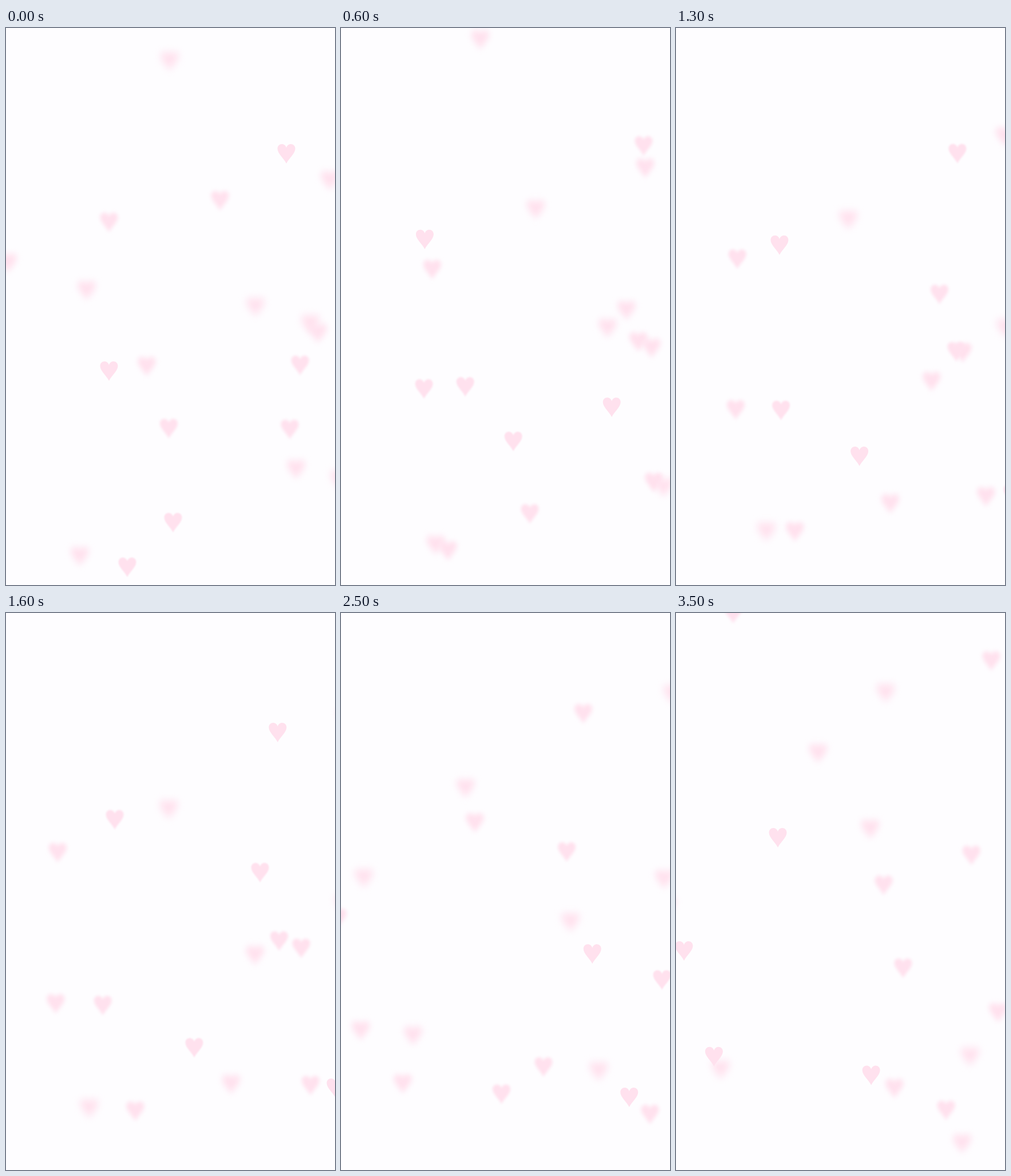
An HTML page with a canvas that plays this animation: 575x974 px, repeating every 3.6 s.

```html
<!DOCTYPE html>
<html lang="en">
<head>
<meta charset="utf-8">
<title>Drifting hearts</title>
<style>
html, body { margin: 0; width: 100%; height: 100%; overflow: hidden; background: #fefdff; }
canvas { display: block; }
</style>
</head>
<body>
<canvas id="stage" width="575" height="974"></canvas>
<script>
const W = 575, H = 974, LOOP = 3600, STEP = 100;
const MAX_BLUR = 6.5, SWING = 2.2;
const ctx = document.getElementById('stage').getContext('2d');

// x, y at the start, speed in px/s, moment of focus in s, [seconds from sharp to softest]
const hearts = [
  [286, 57, -71, -62, 2],
  [490, 219, 65, -23, 0],
  [566, 266, -57, -36.3, 1.65],
  [374, 301, -56, 26, 3.55],
  [180, 339, -56, 49.5, 0.7],
  [3, 410, -55, 30, 1.4],
  [141, 458, 30.7, -61, 1.3, 1.8],
  [436, 487, 50, 61.5, 2.3, 2.4],
  [532, 517, -55, -40, 1.85],
  [545, 533, -42.3, 24.9, 2.45, 4],
  [180, 599, -58.2, 52.2, 0.1, 3.8],
  [246, 591, -48, 59, 1],
  [514, 589, 48, -50, -0.5],
  [284.5, 699.5, 27.8, 37.4, 1.1, 5],
  [496, 701, -38, -64.5, 0.5, 1.8],
  [507, 771, 66, 38, 1.5],
  [583, 789, -31.7, 22.8, 2.6, 3],
  [292, 864, 63.4, -25.4, -0.4, 3.4],
  [129, 923, 60.6, -33, 3.4, 4.6],
  [212, 942, -41.6, -47.8, 3.4, 1.8],
  [649, 286, -28, -58, 4.4],
  [720.5, 505.5, -45, 55, 2.4],
  [686, 570, -48.5, -42, 4.2],
  [-56, 390.5, 20, 57, 3.6, 3.6],
  [-40, -182, 40, 52, 4.1],
  [640, 748.4, -40, 51, 1.7, 2.4]
];

const shape = new Path2D(
  'M0 18C-4 9-15.5 1-15.5-8C-15.5-13-12-16-8-16C-4-16-1-13.5 0-9.5' +
  'C1-13.5 4-16 8-16C12-16 15.5-13 15.5-8C15.5 1 4 9 0 18Z');

function drawHeart(t, [x, y, vx, vy, focus, swing = SWING]) {
  const px = x + vx * t, py = y + vy * t;
  if (px < -40 || px > W + 40 || py < -40 || py > H + 40) return;
  const blur = MAX_BLUR * Math.abs(Math.sin(Math.PI / 2 * (t - focus) / swing));
  ctx.save();
  ctx.filter = blur > 0.25 ? `blur(${blur.toFixed(2)}px)` : 'none';
  ctx.translate(px, py);
  ctx.fill(shape);
  ctx.restore();
}

function draw(ms) {
  const t = Math.floor(ms % LOOP / STEP) * STEP / 1000;
  ctx.fillStyle = '#fefdff';
  ctx.fillRect(0, 0, W, H);
  ctx.fillStyle = '#ffe1ee';
  for (const heart of hearts) drawHeart(t, heart);
}

const start = performance.now();
function tick() {
  draw(performance.now() - start);
  requestAnimationFrame(tick);
}
tick();
</script>
</body>
</html>
```
